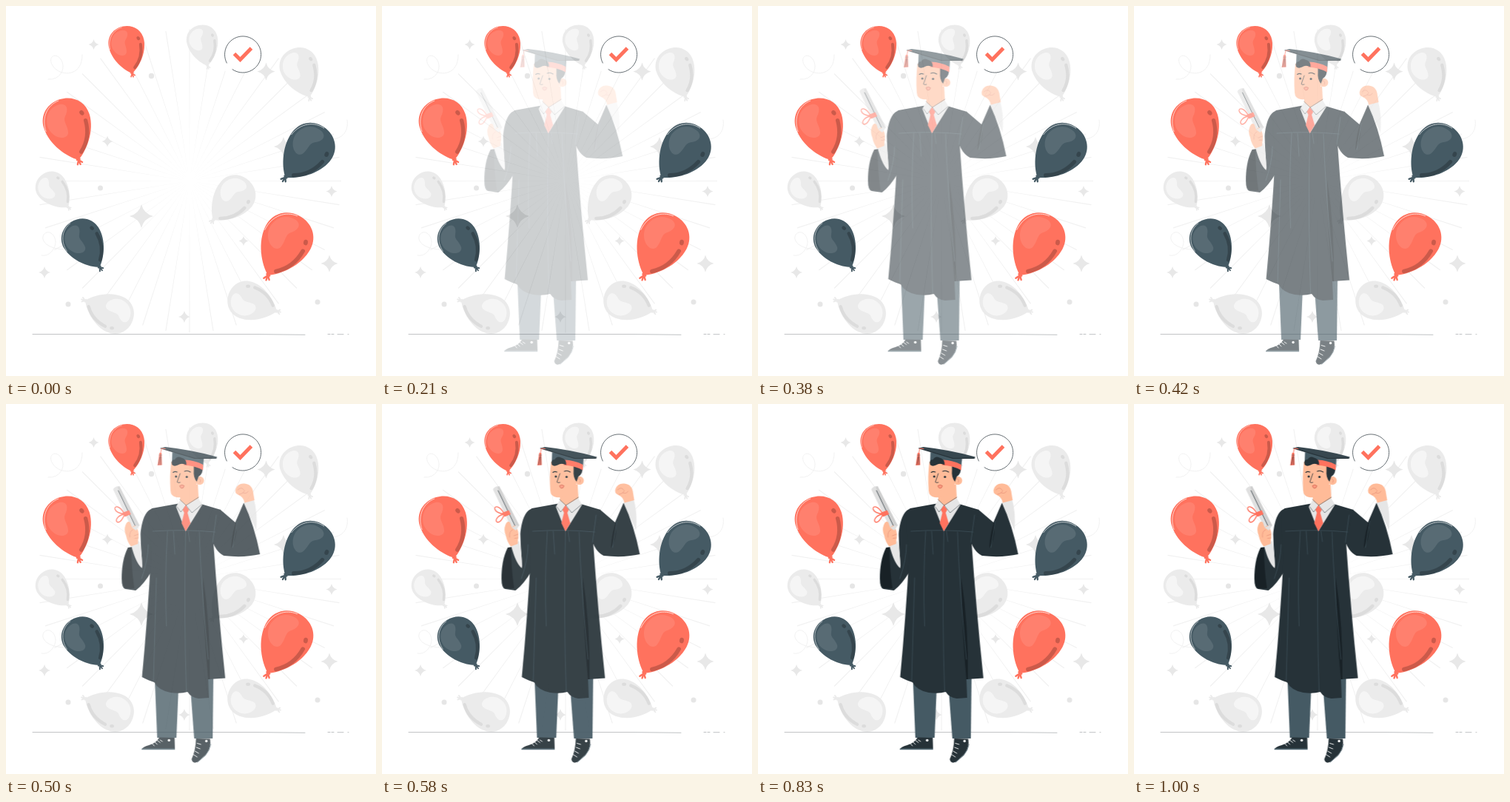
These frames come from a looping animation (500x500 px, 1040 ms). An HTML page:

```html
<!DOCTYPE html>
<html lang="en">
<head>
<meta charset="utf-8">
<title>Graduation</title>
<style>
  html, body { margin: 0; width: 100%; height: 100%; overflow: hidden; background: #fff; }
  svg { display: block; width: 100vw; height: 100vh; }
  .line { fill: none; stroke-linecap: round; stroke-linejoin: round; }
  .coral { color: #ff725e; --hi: .1; --lo: .2; --rim: .75; }
  .slate { color: #455a64; --hi: .1; --lo: .22; --rim: .75; }
  .grey { color: #ebebeb; --hi: .5; --lo: .06; --rim: 0; }
  .ink { fill: #263238; }
  .skin { fill: #ffbb98; }
  .shirt { fill: #e6e6e6; }
  .red { fill: #ff725e; }

  /* Fade and slide in, then a small sway, all on a 25-step grid. */
  #man { animation: enter 1040ms -7ms infinite; }
  @keyframes enter {
    0% { opacity: 0; transform: translateX(-32.5px); animation-timing-function: step-end; }
    8% { opacity: 0; transform: translateX(-32.5px); animation-timing-function: steps(13, end); }
    59.999% { opacity: 1; transform: translateX(1px); animation-timing-function: step-end; }
    60% { opacity: 1; transform: translateX(-.4px); animation-timing-function: steps(5, end); }
    80% { opacity: 1; transform: translateX(1.6px); animation-timing-function: steps(5, end); }
    100% { opacity: 1; transform: translateX(-.9px); }
  }
</style>
</head>
<body>
<svg viewBox="0 0 500 500">
  <defs>
    <!-- Balloon with its tip at 0,0, pointing up -->
    <g id="balloon">
      <path fill="currentColor" d="M0 0C-10 -6 -24 -23 -24 -41C-24 -55 -13 -64 0 -64C13 -64 24 -55 24 -41C24 -23 10 -6 0 0Z"/>
      <path fill="#fff" style="opacity:var(--hi)" d="M-20 -40C-20 -54 -10 -60 -1 -59C7 -57 4 -50 0 -46C-4 -42 0 -36 -2 -29C-5 -22 -18 -27 -20 -40Z"/>
      <path class="line" stroke="#fff" stroke-width=".6" style="opacity:var(--rim)" d="M-23 -37C-23.500 -52 -14 -62 -2 -63"/>
      <g style="opacity:var(--lo)">
        <path class="line" stroke="#000" stroke-width="4" d="M18.500 -36Q18 -18 5 -7"/>
        <ellipse cx="17" cy="-44.500" rx="2.100" ry="2.700" transform="rotate(-20 17 -44.500)"/>
      </g>
      <path class="line" stroke="currentColor" stroke-width="1.700" d="M-1.500 -.5H1.500M0 0L-2.200 4.200M0 0L.6 4.800M0 0L3 3.200"/>
    </g>
  </defs>

  <g id="rays" fill="#f1f1f1"></g>

  <g class="line" stroke="#f0f0f0" stroke-width=".9">
    <path d="M57 99Q69 100 75 90C80 80 75 68 66 67C58 68 59 79 68 86C80 95 103 93 103 66"/>
    <path d="M48 337C59 339 67 328 67 318C65 305 55 303 51 309C46 318 57 328 78 329"/>
    <path d="M461 154C463 167 457 178 442 180"/>
  </g>

  <g id="stars" fill="#e8e8e8"></g>

  <g fill="#e6e6e6">
    <circle cx="196.500" cy="94.500" r="3.700"/>
    <circle cx="127.500" cy="246" r="3.500"/>
    <circle cx="84" cy="403" r="3.500"/>
    <circle cx="421" cy="400" r="3.500"/>
  </g>

  <g id="balloons"></g>

  <g class="line" stroke="#aeb2b4" stroke-width=".8">
    <path d="M36 443.600H340L404 444.300"/>
    <path d="M435 443.500H438M440 443.500H443M448 443.700H456M462 443.700H463"/>
  </g>

  <g>
    <path fill="#fff" d="M297 76L296 88L308 86Z"/>
    <circle cx="319.800" cy="65" r="24.600" fill="#fff"/>
    <path class="line" stroke="#263238" stroke-width=".7" d="M306 85.700A24.600 24.600 0 1 0 298.300 77"/>
    <path fill="none" stroke="#ff725e" stroke-width="5" d="M308.500 64.500L316.500 72.500L331.500 57"/>
  </g>

  <g id="man">
    <!-- legs and shoes -->
    <g fill="#455a64">
      <path d="M207.500 365L211 451H237L240 380Z"/>
      <path d="M256 385L261 452H286L287 365Z"/>
    </g>
    <path class="ink" d="M214 450.500L234.500 451L235 467H190Q191 463.500 200 461Q210 458 214 450.500Z"/>
    <path fill="#546a74" d="M190.500 465.500H235V467.300H190Z"/>
    <path class="ink" d="M263.500 452L282.500 452.500Q284.500 464 277.500 473L266 483.500Q259 487 257.500 480Q263 468 263.500 452Z"/>
    <path class="line" stroke="#546a74" stroke-width="1" d="M283.300 460Q282 468 276 475L265.500 484"/>
    <g class="line" stroke="#fff" stroke-width=".9">
      <path d="M204 458.500L207 462M207.500 456.500L211 460M211 454.500L215 457.500M215 454L218 456"/>
      <path d="M265 458.500L270 460M264 464L269 466M262 469L267 472M260.500 474L265 477"/>
    </g>
    <circle cx="227" cy="454.500" r="1.700" fill="#fff"/>
    <circle cx="277.500" cy="455.500" r="1.700" fill="#fff"/>

    <!-- scroll, raised hand and cuff on the left -->
    <path fill="#e0e0e0" d="M151.500 115.500Q154 110.500 160 111L187 164L182 171L177 168Z"/>
    <path fill="#cfcfcf" d="M160 111L187 164L184 167L157.500 113Z"/>
    <path class="line" stroke="#263238" stroke-width=".8" d="M158.500 117L183 168"/>
    <path class="line" stroke="#ff725e" stroke-width="1.400" d="M167 149C161 137 153 137 154 142C155 146 161 148 167 149C158 150 154 157 157 159.500C161 161 165 154 167 149"/>
    <path class="red" d="M164 147L173 143.500L175.500 149L167 152.500Z"/>
    <path class="ink" d="M206 141C194 143 190 160 188.500 176L189 190L191 221L178 193L171.500 194C165 206 163 222 163 236Q163 249 168 250L182 252Q193 244 204 225Z"/>
    <path fill="#182126" d="M172 194C166 206 164 222 164 236Q164 248 169 249L180 249Q176 222 176 194Z"/>
    <path class="shirt" d="M176 191L187 185Q191 202 190.500 222Q182 215 176 191Z"/>
    <path class="skin" d="M168.500 163Q171 157 174.500 160L177 167Q182 161 184 168Q187 175 185.500 182L185 189L175.500 192.500Q170.500 186 169 178Q165.500 170 168.500 163Z"/>
    <path fill="#e0e0e0" d="M177 167L183.500 164L186.500 165L182.500 171Z"/>
    <path class="line" stroke="#e8927a" stroke-width=".7" d="M174 180Q173 172 178 170M185.500 176L180 178M185.500 181L181 181.500"/>

    <!-- right arm -->
    <path class="shirt" d="M328 133.500L341.500 128Q347 146 345 171Z"/>
    <path class="skin" d="M317 115Q320 106.500 329 107.500Q340 108.500 341 121L342.500 130L329 133.500Q328 126 321 123Q315 120 317 115Z"/>
    <path class="line" stroke="#e8927a" stroke-width=".7" d="M320 116Q325 111 328 116M322 122Q328 121 329 117M327 120Q332 122 334 118"/>
    <path class="ink" d="M296 142.500L316.500 160L328 133.500Q342 163 350 203Q328 208 301 205Q289 199 284 180Z"/>
    <path fill="#182126" d="M320 153Q312 172 311 195Q318 184 318 167Z"/>

    <!-- gown -->
    <path class="ink" d="M240 134.500L204 141Q197 146 200 175L203 200Q198 290 190.500 369Q200 374 207 376Q213 387 229 390Q243 392 252 389Q257 397 267 398L281 397L280 372L303 370.500Q293 275 287 187L297 143L270 135Z"/>
    <path fill="#182126" d="M273 235Q274 310 280 372L282 372Q283 300 273 235Z"/>
    <g class="line" stroke="#455a64" stroke-width=".6">
      <path d="M205 172Q248 169 289 173"/>
      <path d="M249.500 172Q247 290 250.500 388"/>
      <path d="M225 172Q221 235 223.500 300"/>
      <path d="M233 172L235 203M253 172L255 186M210 235L206 373"/>
      <path d="M268 173Q270 240 280 345M291 150L286 187M199 190Q199 210 190 236M313 194L319 158"/>
    </g>

    <!-- shirt, neck and tie -->
    <path class="shirt" d="M241 131L236.500 139L249.500 172L272 136L266 126Z"/>
    <path class="skin" d="M242 118V130L250 137L267 127L266 108Z"/>
    <path class="line" stroke="#263238" stroke-width=".5" d="M241.500 129L250 137L267 126M250 137L258 147L271 136M250 137L243 146L238 139"/>
    <path class="red" d="M249.500 136.500L254 143L252 147L256 161L249.500 172L244 161L247.500 147L245.500 143Z"/>

    <!-- head -->
    <circle class="skin" cx="268.500" cy="103.500" r="5.800"/>
    <path class="skin" d="M230 78Q227.500 98 229 117Q229.500 125 237 126Q247 127 253 123Q263 118 265 104L266 82Z"/>
    <path class="ink" d="M260.500 82L272 86Q273.500 94 267 98L264.500 105Q259.500 99 260.500 90Z"/>
    <g class="line" stroke="#263238" stroke-width="1.100">
      <path d="M232.500 92.500Q235 90.500 238 92M248 91Q252 89 256 92"/>
      <path stroke-width=".8" d="M242 94L238 105.500Q239 107 242 106"/>
      <path stroke="#e8927a" stroke-width=".8" d="M267 101Q271 101 269 106"/>
    </g>
    <circle class="ink" cx="236.500" cy="98" r="1.500"/>
    <circle class="ink" cx="251" cy="98.500" r="1.500"/>
    <path fill="#ff9a80" stroke="#c9604d" stroke-width=".7" d="M241.500 110.500Q244.500 108 247.500 110.500Q247 114 244 114Q242 113.500 241.500 110.500Z"/>

    <!-- cap -->
    <path fill="#455a64" d="M231.500 65L231 78Q240 71 250 77L273 88L274 73Z"/>
    <path class="red" d="M248 75.500Q262 76 273 82L273 89.500Q261 83 247 82.500Z"/>
    <path class="ink" d="M231 82Q229 75 235 75Q238 69.500 243.500 72.500Q251 74 250.500 82.500Q244 79 239 82.500Q234 85 231 82Z"/>
    <path fill="#37474f" d="M215.500 59.500L222 58Q258 62 292 71.500L290.500 74L262 74Z"/>
    <path class="line" stroke="#263238" stroke-width="1.200" d="M216 59.800L262 73.500L291 73"/>
    <path class="line" stroke="#ff725e" stroke-width="1" d="M222 60.500L217 60L215.500 67"/>
    <path class="red" d="M214 66H217L217.500 82.500L211.500 83Z"/>
    <path class="line" stroke="#263238" stroke-width=".6" d="M214 69H217M215 71L213 82M216 71V82"/>
  </g>
</svg>

<script>
  const add = (id, tag, attrs) => {
    const el = document.createElementNS("http://www.w3.org/2000/svg", tag);
    for (const key in attrs) el.setAttribute(key, attrs[key]);
    document.getElementById(id).append(el);
  };

  // Thin wedges that fade out towards the middle
  for (let i = 0; i < 40; i++) {
    add("rays", "path", {
      d: "M0 0L205 -.6V.6Z",
      transform: `translate(248 236.5) rotate(${i * 9})`
    });
  }

  // x, y, radius
  const stars = [
    [118.5, 52, 7], [137, 183, 7.5], [351.5, 88.5, 12], [183, 284, 16], [375, 190, 13],
    [440, 250.5, 7.5], [321, 317.5, 6.5], [437, 348, 11.5], [52, 360, 8], [241, 420, 8]
  ];
  for (const [x, y, r] of stars) {
    const q = r * 0.2;
    add("stars", "path", {
      d: `M0 ${-r}Q${q} ${-q} ${r} 0Q${q} ${q} 0 ${r}Q${-q} ${q} ${-r} 0Q${-q} ${-q} 0 ${-r}Z`,
      transform: `translate(${x} ${y})`
    });
  }

  // tint, tip x, tip y, tilt, scale
  const balloons = [
    ["grey", 272.5, 81, -12, 0.88], ["grey", 410, 123, -19, 1.08], ["grey", 280, 289, 42, 1.12],
    ["grey", 84, 272, -40, 0.88], ["grey", 107, 398, 115, 1.09], ["grey", 366, 412.5, -70, 1.08],
    ["coral", 170.5, 91, -11, 1.01], ["coral", 98, 208, -17, 1.34], ["coral", 354, 364, 28, 1.42],
    ["slate", 377.5, 231.5, 40, 1.34], ["slate", 126.5, 353, -32, 1.13]
  ];
  for (const [tint, x, y, tilt, scale] of balloons) {
    add("balloons", "use", {
      href: "#balloon", class: tint,
      transform: `translate(${x} ${y}) rotate(${tilt}) scale(${scale})`
    });
  }
</script>
</body>
</html>
```
